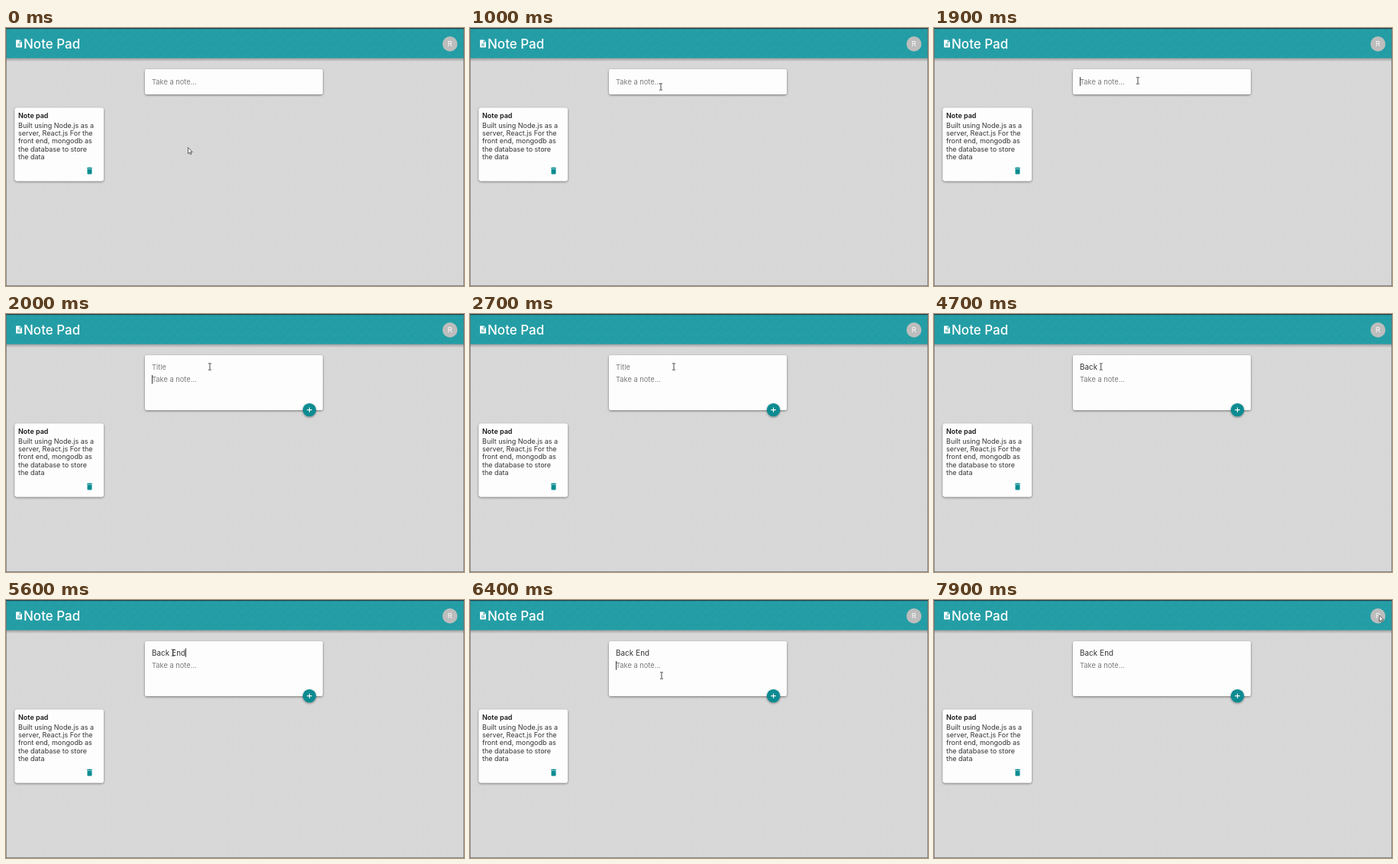
An HTML page that plays this animation: 600x338 px, repeating every 8 s.

```html
<!DOCTYPE html>
<html lang="en">
<head>
<meta charset="utf-8">
<title>Note Pad</title>
<style>
  html, body { margin: 0; width: 100%; height: 100%; overflow: hidden; background: #d9d8d9; }
  svg { display: block; width: 100vw; height: 100vh; }
  text { font-family: Inter, "Open Sans", sans-serif; white-space: pre; }
  .brand { font-size: 17px; font-weight: 500; fill: #fff; }
  .heading { font-size: 9px; font-weight: 600; fill: #171717; }
  .body { font-size: 9px; fill: #333; }
  .hint { font-size: 9.3px; fill: #7b7b7b; }
  .value { font-size: 9.8px; fill: #333; letter-spacing: .1px; }
  .paper { fill: #fefdfe; filter: url(#shadow); }
</style>
</head>
<body>
<svg viewBox="0 0 600 338" preserveAspectRatio="none">
  <defs>
    <filter id="shadow" x="-10%" y="-20%" width="120%" height="150%">
      <feDropShadow dx="0" dy="1" stdDeviation="1.4" flood-color="#000" flood-opacity=".48"/>
    </filter>
    <linearGradient id="fade" x2="0" y2="1">
      <stop stop-color="#000" stop-opacity=".3"/>
      <stop offset="1" stop-color="#000" stop-opacity="0"/>
    </linearGradient>
    <pattern id="weave" width="12" height="12" patternUnits="userSpaceOnUse">
      <path d="M0 6L6 0M0 9L9 0M0 12L6 6M6 6L12 12M9 6L12 9M6 9L9 12" fill="none" stroke="#00505a" stroke-width=".7"/>
    </pattern>
    <pattern id="linen" width="8" height="8" patternUnits="userSpaceOnUse">
      <path d="M0 8L8 0M0 4L4 0" fill="none" stroke="#777" stroke-width=".7"/>
    </pattern>
  </defs>

  <rect width="600" height="338" fill="#d9d8d9"/>
  <rect width="600" height="338" fill="url(#linen)" opacity=".04"/>
  <rect y="39" width="600" height="5" fill="url(#fade)"/>
  <rect width="600" height="39.5" fill="#259fa7"/>
  <rect width="600" height="39.5" fill="url(#weave)" opacity=".13"/>
  <rect width="600" height="1.2" fill="#263f49"/>
  <path d="M.3 1V338M599.7 1V338M0 337.6H600" stroke="#686a6c" stroke-width=".8"/>

  <path transform="translate(11 14.5) scale(.5)" fill="#fff" d="M14 2H6C4.900 2 4 2.900 4 4V20C4 21.100 4.900 22 6 22H18C19.100 22 20 21.100 20 20V8ZM16 18H8V16H16ZM16 14H8V12H16ZM13 9V3.500L18.500 9Z"/>
  <text class="brand" x="23" y="27">Note Pad</text>
  <circle cx="581.6" cy="20.9" r="9.8" fill="#bdbdbd"/>
  <text x="581.6" y="24.3" text-anchor="middle" font-size="9.5" font-weight="500" fill="#f2f2f2">R</text>

  <rect id="form" class="paper" x="182" y="54" width="233" height="33" rx="3"/>
  <text id="title" x="191" y="72.600"></text>
  <text id="hint" class="hint" x="191" y="73.600">Take a note...</text>
  <rect id="caret" width=".9" height="11.500" fill="#222"/>
  <g id="add">
    <circle cx="397.500" cy="125.600" r="8.700" fill="#078b91" filter="url(#shadow)"/>
    <path d="M394.300 125.600h6.400M397.500 122.400v6.400" stroke="#fff" stroke-width="1.100"/>
  </g>

  <g id="note">
    <rect class="paper" x="11.500" y="104.500" width="116.500" height="96" rx="3"/>
    <text class="heading" x="16" y="117.800">Note pad</text>
    <g id="lines" class="body"></g>
    <path transform="translate(103.500 181) scale(.5)" fill="#078b91" d="M6 19c0 1.100.9 2 2 2h8c1.100 0 2-.9 2-2V7H6v12zM19 4h-3.500l-1-1h-5l-1 1H5v2h14V4z"/>
  </g>

  <path id="arrow" d="M0 0V8.200L1.900 6.500L3.100 9.200L4.400 8.600L3.200 6H5.700Z" fill="#fff" stroke="#333" stroke-width=".75" stroke-linejoin="round"/>
  <path id="beam" d="M-2-4.200H-.6L0-3.700L.6-4.200H2M0-3.700V3.700M-2 4.200H-.6L0 3.700L.6 4.200H2" fill="none" stroke="#333" stroke-width=".9"/>
</svg>
<script>
const LOOP = 8000, STEP = 100, BLINK = 500;
const OPEN = 2000;
const $ = id => document.getElementById(id);
const show = (el, on) => el.setAttribute('visibility', on ? 'visible' : 'hidden');
const move = (el, x, y) => el.setAttribute('transform', `translate(${x} ${y})`);

// time, x, y
const path = [
  [0, 238.5, 156.5], [500, 250, 77], [1000, 250, 77], [1300, 256, 76],
  [1400, 256, 76], [1700, 267, 69], [2700, 267, 69], [3100, 218.8, 69],
  [5800, 218.8, 69], [6200, 251, 99], [6400, 251, 99], [6700, 480, 47],
  [6900, 480, 47], [7200, 584, 19], [7400, 584, 19], [7900, 583.3, 20]
];
const keys = [[3900, 'B'], [4000, 'a'], [4100, 'c'], [4200, 'k'],
              [5000, ' '], [5100, 'E'], [5300, 'n'], [5400, 'd']];
const focus = [[1900, 'note'], [3100, 'title'], [6200, 'note']];

['Built using Node.js as a', 'server, React.js For the', 'front end, mongodb as',
 'the database to store', 'the data'].forEach((line, i) => {
  const el = document.createElementNS('http://www.w3.org/2000/svg', 'text');
  el.setAttribute('x', 16);
  el.setAttribute('y', 131 + i * 10.2);
  el.textContent = line;
  $('lines').append(el);
});

function pointer(t) {
  const i = path.findIndex(p => p[0] > t);
  if (i < 0) return path[path.length - 1].slice(1);
  const [t0, x0, y0] = path[i - 1], [t1, x1, y1] = path[i];
  const u = (t - t0) / (t1 - t0), e = u * u * (3 - 2 * u);
  return [x0 + (x1 - x0) * e, y0 + (y1 - y0) * e];
}

function drawCaret(t, open, typed) {
  const field = focus.filter(f => f[0] <= t).pop();
  if (!field) return show($('caret'), false);
  const [start, name] = field;
  const inTitle = name === 'title';
  const last = inTitle && typed.length ? typed[typed.length - 1][0] : start;
  const x = inTitle && typed.length ? 191 + $('title').getComputedTextLength() : 191;
  $('caret').setAttribute('x', x);
  $('caret').setAttribute('y', inTitle ? 63.3 : open ? 80 : 64.3);
  show($('caret'), Math.floor((t - last) / BLINK) % 2 === 0);
}

function render(ms) {
  const t = Math.floor((ms % LOOP) / STEP) * STEP;
  const open = t >= OPEN;
  const typed = keys.filter(k => k[0] <= t);

  $('form').setAttribute('height', open ? 72 : 33);
  $('hint').setAttribute('y', open ? 89.2 : 73.6);
  move($('note'), 0, open ? 39 : 0);
  show($('add'), open);

  show($('title'), open);
  $('title').setAttribute('class', typed.length ? 'value' : 'hint');
  $('title').textContent = typed.length ? typed.map(k => k[1]).join('') : 'Title';
  drawCaret(t, open, typed);

  const [x, y] = pointer(t);
  const overText = x > 185 && x < 412 && y > 57 && y < (open ? 115 : 84);
  show($('beam'), overText);
  show($('arrow'), !overText);
  move(overText ? $('beam') : $('arrow'), x, y);
}

const begin = performance.now();
function tick() {
  render(performance.now() - begin);
  requestAnimationFrame(tick);
}
tick();
</script>
</body>
</html>
```
